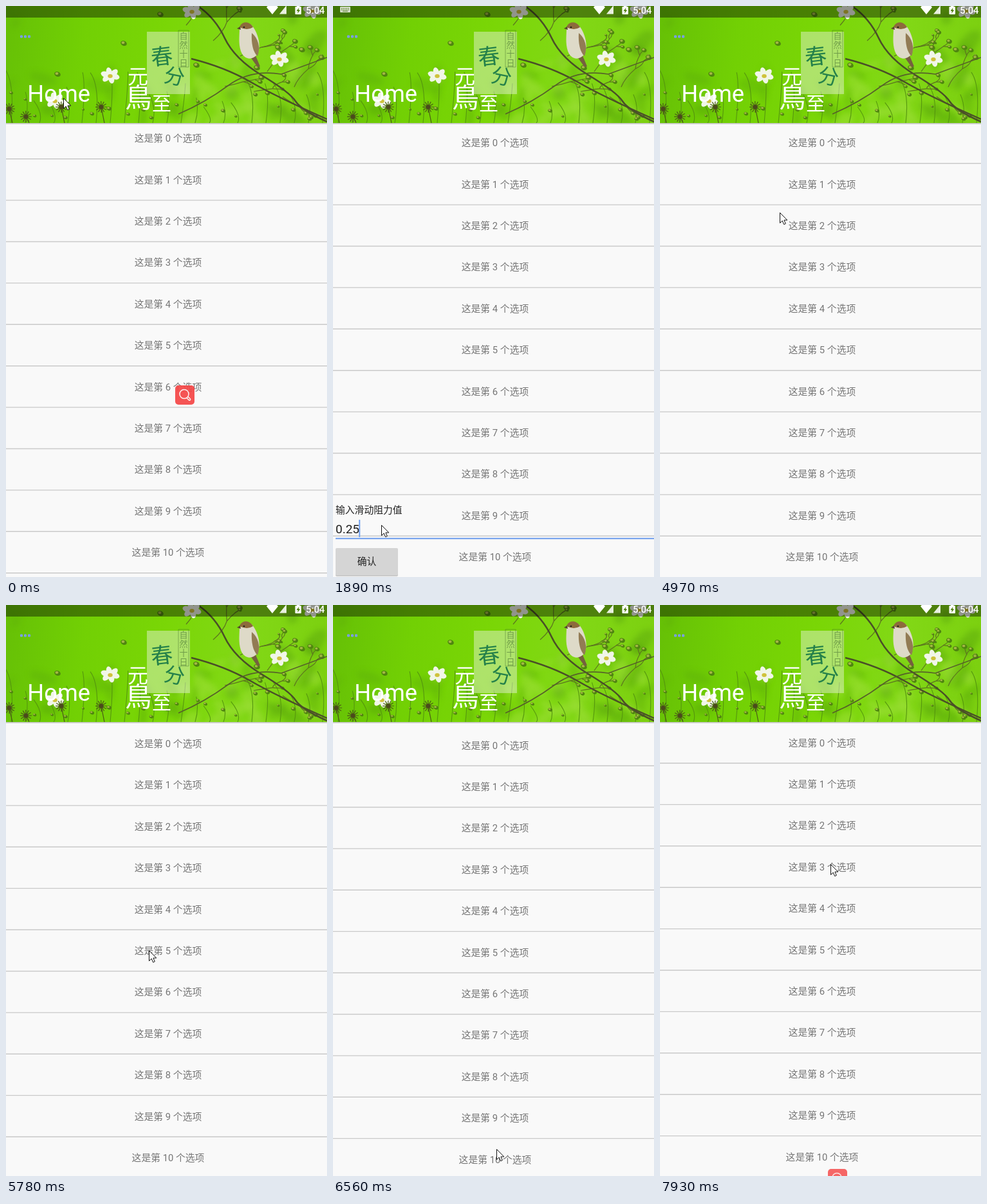
Write an HTML page with a canvas that moves like this. It is 499 px wide and 888 px high and loops after 8 s.

```html
<!DOCTYPE html>
<html lang="zh-CN">
<head>
<meta charset="utf-8">
<style>
html, body { margin: 0; width: 100%; height: 100%; overflow: hidden; background: #f9f9f9; }
canvas { display: block; }
</style>
</head>
<body>
<canvas id="stage" width="499" height="888"></canvas>
<script>
const LOOP = 8000, W = 499, H = 888, HEAD = 182, ROW = 64.4, OPEN = 930, CLOSE = 4300;
const FONT = 'Roboto, "Noto Sans CJK SC", "Noto Sans CJK", sans-serif';
const stage = document.getElementById('stage').getContext('2d');
let g = stage;

let seed = 11;
const rnd = (a, b) => {
  seed = seed * 16807 % 2147483647;
  return a + (b - a) * seed / 2147483647;
};

// 0 to 1 between two times
const ramp = (t, a, b) => Math.min(1, Math.max(0, (t - a) / (b - a)));

// The list springs back, is dragged against resistance, then let go
const listY = t => 205.5 + 7 * ramp(t, 120, 700) + 5.5 * ramp(t, 4970, 6600) - 4.2 * ramp(t, 7150, 7930);

// Pointer stops: time, x, y
const stops = [[120, 89, 143], [670, 28, 45], [1200, 28, 45], [1474, 189, 420], [1750, 140, 849],
  [1885, 75, 807], [3920, 75, 807], [4180, 60, 849], [4650, 178, 490], [4850, 186, 321],
  [4970, 186, 321], [6320, 246, 680], [6640, 256, 900], [7200, 262, 900], [7930, 265, 403]];

function pointer(t) {
  const i = Math.max(1, stops.findIndex(s => s[0] >= t));
  const b = t > 7930 ? stops.at(-1) : stops[i], a = t > 7930 ? b : stops[i - 1];
  const p = ramp(t, a[0], b[0] + .001);
  return [a[1] + (b[1] - a[1]) * p, a[2] + (b[2] - a[2]) * p];
}

function text(s, x, y, size, color, align = 'left', weight = 400) {
  g.font = `${weight} ${size}px ${FONT}`;
  g.fillStyle = color;
  g.textAlign = align;
  g.fillText(s, x, y);
}

function rect(x, y, w, h, color, r = 0) {
  g.fillStyle = color;
  g.beginPath();
  g.roundRect(x, y, w, h, r);
  g.fill();
}

function shape(d, fill, stroke, width = 1) {
  const p = new Path2D(d);
  if (fill) { g.fillStyle = fill; g.fill(p); }
  if (stroke) { g.strokeStyle = stroke; g.lineWidth = width; g.stroke(p); }
}

function oval(x, y, rx, ry, color, turn = 0) {
  g.fillStyle = color;
  g.beginPath();
  g.ellipse(x, y, rx, ry, turn, 0, 7);
  g.fill();
}

function glyph(s, x, y, size, color, turn = 0, weight = 400) {
  g.save();
  g.translate(x, y);
  g.rotate(turn);
  text(s, 0, size * .37, size, color, 'center', weight);
  g.restore();
}

function flower(x, y, r) {
  for (let i = 0; i < 6; i++) {
    const a = i * 1.047 + .3;
    oval(x + Math.cos(a) * r * .5, y + Math.sin(a) * r * .35, r * .5, r * .3, '#f1f6e8', a);
  }
  oval(x, y + 1, r * .25, r * .2, '#cfc23c');
}

function thistle(x, y, r) {
  let d = `M${x} ${y}L${x + 5} ${HEAD}`;
  for (let a = 0; a < 6.2; a += .52) d += `M${x} ${y}l${Math.cos(a) * r} ${Math.sin(a) * r}`;
  shape(d, null, '#4a5a18', 1.2);
  oval(x, y, r * .4, r * .4, '#4b4a1c');
}

function bud(x, y, r) {
  oval(x, y, r, r * .75, '#4f8510', .4);
  oval(x - 1, y - 1, r * .5, r * .4, '#a5b645');
}

function twig(x, y, angle, length) {
  const ex = x + Math.cos(angle) * length, ey = y + Math.sin(angle) * length;
  shape(`M${x} ${y}Q${(x + ex) / 2 + rnd(-8, 8)} ${(y + ey) / 2} ${ex} ${ey}`, null, '#5c7420', 1.2);
  if (length < 18) return bud(ex, ey, rnd(2, 5));
  twig(ex, ey, angle + rnd(-.7, .2), length * .6);
  twig(ex, ey, angle + rnd(.1, .8), length * .5);
}

function drawBird() {
  shape('M385 70L395 94L391 95L379 78Z', '#75603f');
  shape('M363 36C365 24 379 24 385 34C393 46 397 64 390 76C381 86 369 82 365 70C361 58 363 46 363 36Z', '#dedac8');
  shape('M382 42C392 50 396 64 391 78C384 72 381 58 382 42Z', '#927b54');
  shape('M363 33C366 23 379 23 384 33Q375 39 363 33Z', '#8d6a3c');
  shape('M364 32L359 35L365 37Z', '#57472e');
  oval(370, 33, 1.3, 1.3, '#222');
}

function drawCard() {
  rect(219, 40, 67, 97, 'rgba(225,242,205,.5)');
  glyph('春', 242, 78, 34, '#24804a', -.12, 500);
  glyph('分', 262, 109, 32, '#24804a', .2, 500);
  g.globalAlpha = .6;
  shape('M268 38H284V95H268Z', null, '#466e32', .8);
  [...'自然十日'].forEach((c, i) => glyph(c, 276, 46 + i * 14, 13, '#466e32', 0, 300));
  g.globalAlpha = 1;
  glyph('元', 205, 109, 32, '#fff');
  glyph('鳥', 206, 142, 42, '#fff');
  glyph('至', 242, 151, 30, '#fff');
}

function drawStatus() {
  rect(0, 0, W, 18, 'rgba(0,0,0,.4)');
  shape('M405 2Q409 -3 414 -3T423 2L414 13Z', '#fff');
  shape('M436 -1V12.5H425Z', '#e9f0e0');
  rect(449.5, 1, 9.5, 12, '#fff', 1);
  rect(452, -1, 4.5, 3, '#fff');
  shape('M455.5 2.5L451.5 8H454L453 12L457.3 6.3H454.8Z', '#4d7d0a');
  text('5:04', 495.5, 11.5, 14.8, '#fff', 'right', 500);
}

function drawHeader() {
  const base = g.createLinearGradient(0, 0, W, 60);
  ['#66c006', '#72d004', '#7ad606', '#82d816', '#7cd010'].forEach((c, i) => base.addColorStop(i / 4, c));
  rect(0, 0, W, HEAD, base);

  // soft leaves behind, denser to the right and below
  g.filter = 'blur(4px)';
  for (let i = 0; i < 50; i++)
    oval(W * Math.sqrt(rnd(0, 1)), HEAD * Math.sqrt(rnd(0, 1)), rnd(6, 24), rnd(4, 12),
      ['#5eae0a66', '#a6e04466', '#4f970c55'][i % 3], rnd(0, 3));
  g.filter = 'none';

  for (let x = 8; x < W; x += 22) {
    const y = rnd(95, 160);
    shape(`M${x} ${HEAD}Q${x + 6} ${y + 20} ${x + rnd(-12, 12)} ${y}`, null, '#55960f', 1.1);
    bud(x + rnd(-8, 8), rnd(135, 175), rnd(2, 4));
  }
  for (let i = 0; i < 5; i++) twig(280 + i * 42, 30 + i * 24, rnd(-1.2, -.3), 36);
  for (let i = 0; i < 3; i++) twig(340 + i * 45, 125 + i * 8, rnd(-.6, 1), 30);
  shape('M298 0Q325 18 340 50T398 108T450 148T499 180', null, '#4a4f28', 2.6);
  shape('M288 82Q340 95 380 118T499 176', null, '#4a4f28', 2.4);
  shape('M268 168Q310 150 345 124T428 106L499 80', null, '#56602a', 1.6);

  for (const [x, y] of [[183, 58], [80, 106], [296, 92], [240, 13], [390, 96], [460, 68]]) bud(x, y, 5);
  for (const [x, y] of [[162, 108], [425, 82], [476, 7], [289, 8], [76, 147]]) flower(x, y, 15);
  for (const [x, y] of [[5, 160], [31, 172], [86, 157], [148, 157]]) thistle(x, y, 9);
  drawBird();
  drawCard();
  text('Home', 33.3, 148.5, 36.3, '#fff');
  for (let i = 0; i < 3; i++) rect(22 + i * 6, 45.5, 4, 4, '#7a9ff5', 1);
  drawStatus();
}

function drawList(y) {
  for (let i = 0; i < 11; i++) {
    const cy = y + i * ROW;
    text(`这是第 ${i} 个选项`, 252, Math.round(cy + 5.7), 14.8, '#757575', 'center');
    rect(0, cy + 31.5, W, 1.4, '#c9c9c9');
  }
  rect(0, HEAD, W, 1.8, '#c9c9c9');
}

function drawKeyboardIcon() {
  rect(11, 1, 16, 9, '#d3dcc8', 1);
  for (let i = 0; i < 10; i++) rect(13 + i % 5 * 2.6, 3 + (i > 4) * 2.2, 1.2, 1.2, '#557d20');
  rect(15, 7.5, 8, 1, '#557d20');
}

function drawForm(t) {
  const value = t < 2690 ? '0.25' : t < 2830 ? '0.2' : t < 3110 ? '0.' : t < 3520 ? '0.0' : '0.01';
  text('输入滑动阻力值', 4, 789.3, 14.8, '#222');
  text(value, 4, 819.8, 19, '#222');
  const end = 3.2 + g.measureText(value).width;
  const hidden = t >= 2410 && t < 2690 || t >= 3920;
  if (!hidden) rect(t < 1750 ? 4 : end, 799, 2, 27, '#6f9fee');
  rect(4, 827, W - 4, 2.3, '#7ba6ee');
  rect(4, 844, 97, 43, '#c4c4c4', 2);
  rect(4, 843, 97, 42.5, '#d5d5d5', 2);
  text('确认', 52.5, 868.7, 14.8, '#222', 'center', 500);
}

function drawLens(x, y, alpha) {
  g.save();
  g.globalAlpha = alpha;
  g.translate(x, y);
  rect(0, 0, 30, 30, '#f44545', 5);
  g.lineCap = 'round';
  shape('M21 13.5A7 7 0 1 1 7 13.5A7 7 0 1 1 21 13.5M18 19.5L21.5 23Q24 24 23.5 21L20 17.5', null, '#fff', 1.5);
  g.restore();
}

function drawPointer(x, y) {
  g.save();
  g.translate(Math.round(x) + .5, Math.round(y) + .5);
  shape('M0 0V16L3.7 12.5L6.2 18.2L8.8 17L6.4 11.5H11.3Z', '#fff', '#111');
  g.restore();
}

const header = document.createElement('canvas');
header.width = W;
header.height = HEAD;
g = header.getContext('2d');
drawHeader();
g = stage;

function draw(now) {
  const t = now % LOOP;
  rect(0, 0, W, H, '#f9f9f9');
  drawList(listY(t));
  g.drawImage(header, 0, 0);
  if (t >= OPEN && t < CLOSE) {
    drawKeyboardIcon();
    drawForm(t);
  }
  if (t < OPEN) drawLens(263, 590, .92 - t / 4000);
  if (t >= 7150) drawLens(261, 877, 1 - (t - 7150) / 4300);
  drawPointer(...pointer(t));
  requestAnimationFrame(() => draw(performance.now() - start));
}
const start = performance.now();
draw(0);
</script>
</body>
</html>
```
